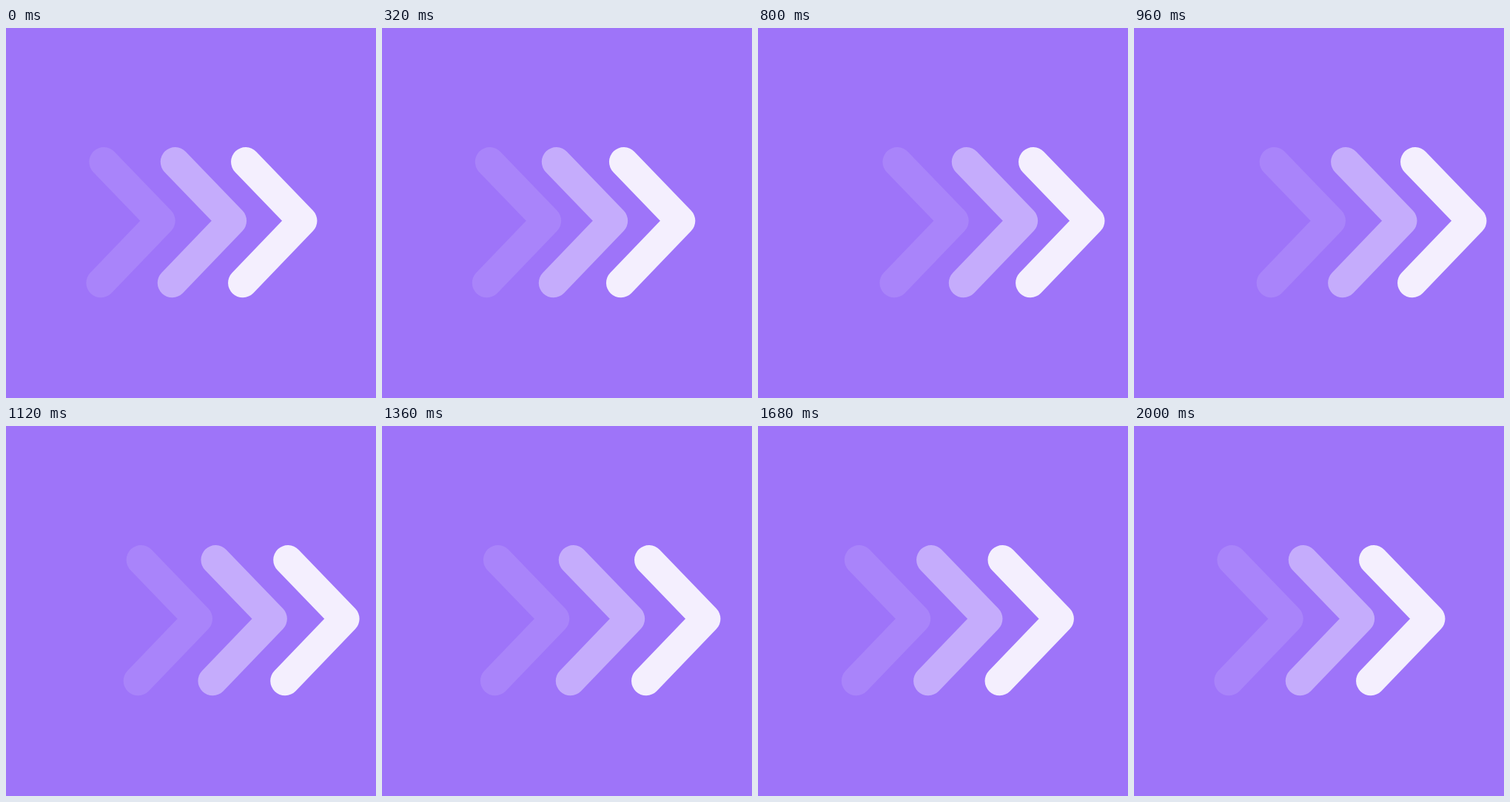
Recreate the animation shown at these times as an HTML page. Size 500 by 500 pixels, loop 2280 ms.

```html
<!DOCTYPE html>
<html lang="en">
<head>
<meta charset="utf-8">
<title>Chevrons</title>
<style>
  html, body { margin: 0; width: 100%; height: 100%; overflow: hidden; background: #9e74f9; }
  svg { display: block; width: 100%; height: 100%; }
  path { fill: none; stroke: #fff; stroke-width: 39.7; stroke-linecap: round; stroke-linejoin: round; }
</style>
</head>
<body>
<svg viewBox="0 0 500 500"></svg>
<script>
const LOOP = 2280, STEP = 40;
const TRAVEL = 57.5, FORWARD = 920, RETURN_END = 2000;

const chevrons = [
  { x: -191.7, delay: 0, opacity: 0.115 },
  { x: -95.3, delay: 80, opacity: 0.4 },
  { x: 0, delay: 160, opacity: 0.885 }
];

const svg = document.querySelector("svg");
for (const c of chevrons) {
  c.node = document.createElementNS("http://www.w3.org/2000/svg", "path");
  c.node.setAttribute("d", "M323.9 180.9 L400.6 260.6 L319.9 344.4");
  c.node.setAttribute("stroke-opacity", c.opacity);
  svg.append(c.node);
}

// Cubic Bezier easing with control points (x1, 0) and (x2, 1).
function ease(x1, x2) {
  return x => {
    if (x <= 0) return 0;
    if (x >= 1) return 1;
    let lo = 0, hi = 1;
    for (let i = 0; i < 24; i++) {
      const s = (lo + hi) / 2, r = 1 - s;
      if (3 * s * r * r * x1 + 3 * s * s * r * x2 + s ** 3 < x) lo = s;
      else hi = s;
    }
    return lo * lo * (3 - 2 * lo);
  };
}

const easeOut = ease(0.485, 0.503);
const easeBack = ease(0.345, 0.31);

function shift(time, delay) {
  const peak = delay + FORWARD;
  return TRAVEL * (time < peak
    ? easeOut((time - delay) / FORWARD)
    : 1 - easeBack((time - peak) / (RETURN_END - peak)));
}

function draw(time) {
  for (const c of chevrons) {
    c.node.setAttribute("transform", `translate(${(c.x + shift(time, c.delay)).toFixed(3)} 0)`);
  }
}

function tick() {
  const time = performance.now() % LOOP;
  draw(Math.floor(time / STEP) * STEP);
  requestAnimationFrame(tick);
}
tick();
</script>
</body>
</html>
```
